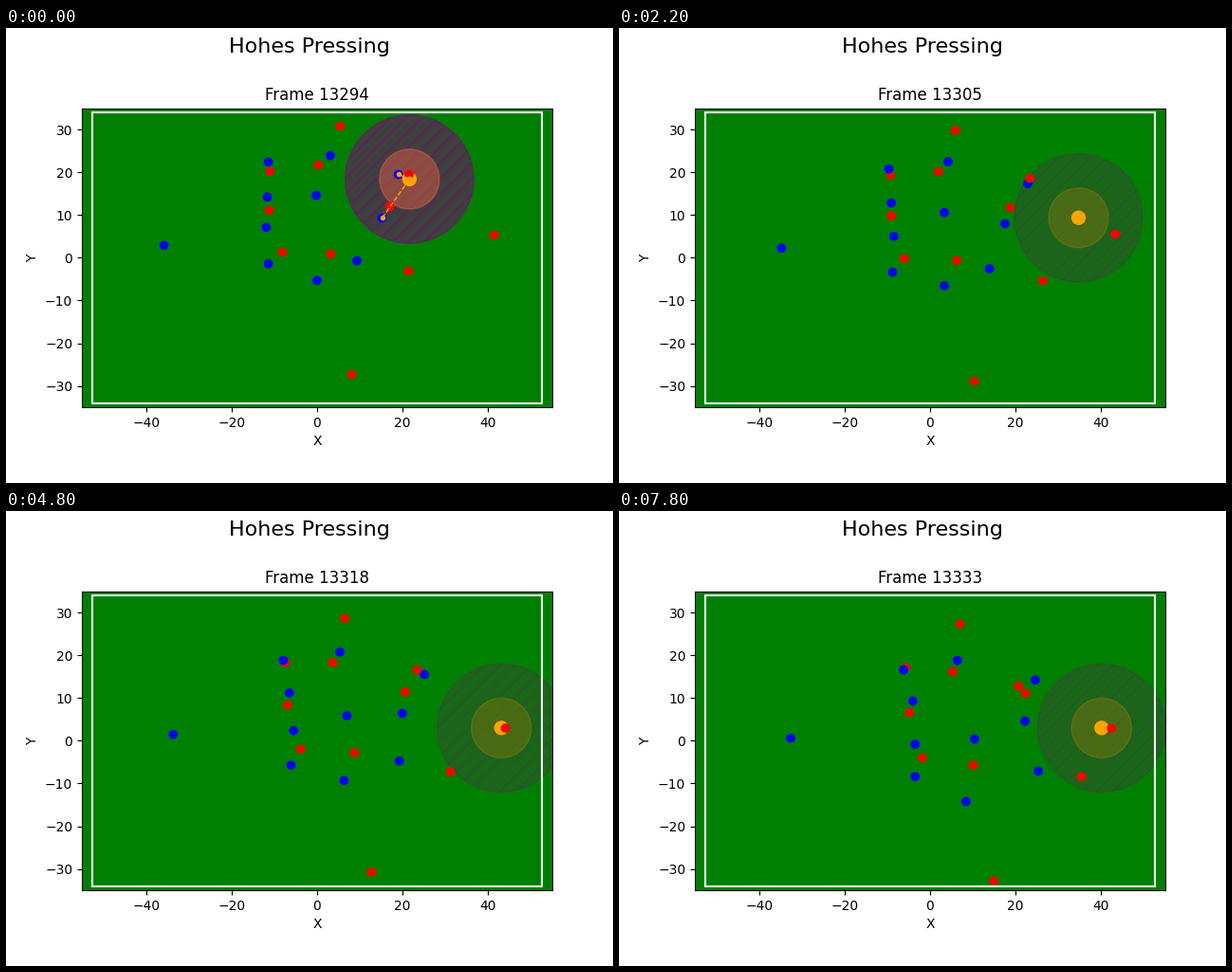
A matplotlib script that plays this animation: 640x480 px, repeating every 8000 ms.

```python
import numpy as np
import matplotlib.pyplot as plt
from matplotlib.animation import FuncAnimation
from matplotlib.patches import Circle, Rectangle

FRAMES, INTERVAL, FIRST = 40, 200, 13294
NEAR, FAR = 7, 15  # pressing radii in metres

# Paths are pitch positions in metres, evenly spaced over the loop
BALL = [(21.6, 18.4), (33.3, 10.3), (41.7, 4.4), (42.8, 2.4), (40.1, 3.0)]
RED = [
    [(5.4, 30.8), (7.0, 27.3)],
    [(0.3, 21.7), (5.3, 16.2)],
    [(-11.0, 20.2), (-5.7, 17.1)],
    [(-11.2, 11.1), (-4.8, 6.6)],
    [(-8.1, 1.3), (-1.8, -4.0)],
    [(3.2, 0.9), (8.0, -2.0), (10.1, -5.7)],
    [(8.1, -27.3), (14.9, -32.8)],
    [(21.4, -3.1), (29.6, -6.7), (35.4, -8.4)],
    [(41.4, 5.3), (43.5, 5.2), (44.0, 2.6), (42.4, 2.9)],
    [(17.0, 12.0), (22.3, 11.1)],
]
BLUE = [
    [(-11.4, 22.4), (-6.2, 16.6)],
    [(3.1, 23.9), (6.4, 18.8)],
    [(-11.6, 14.2), (-4.0, 9.3)],
    [(-11.9, 7.1), (-6.4, 3.3), (-3.5, -0.8)],
    [(-11.4, -1.4), (-3.5, -8.4)],
    [(-35.8, 2.9), (-32.6, 0.6)],
    [(-0.2, 14.6), (10.4, 0.4)],
    [(0.0, -5.3), (5.4, -8.2), (8.4, -14.2)],
    [(9.3, -0.7), (17.4, -4.0), (25.3, -7.1)],
    [(15.2, 9.3), (22.2, 4.6)],
    [(19.0, 19.5), (24.6, 16.1), (24.6, 14.2)],
]
WINGER = [(21.5, 19.5), (23.6, 17.4), (20.7, 12.8)]  # red, drawn on top


def place(path, u):
    """Position on a path at loop fraction u."""
    pts = np.array(path)
    if len(pts) == 2:  # straight run that slows down along the pitch
        return pts[0] + (pts[1] - pts[0]) * (u + 0.25 * u * (1 - u), u)
    knots = np.linspace(0, 1, len(pts))
    return np.polyval(np.polyfit(knots, pts, len(pts) - 1), u)if pts.ndim == 1 \
        else np.array([np.polyval(np.polyfit(knots, c, len(pts) - 1), u)
                       for c in pts.T])


fig, ax = plt.subplots(figsize=(6.4, 4.8), dpi=100)
fig.suptitle("Hohes Pressing", fontsize=16)
ax.set(xlim=(-55, 55), ylim=(-35, 35), xlabel="X", ylabel="Y",
       facecolor="green", aspect="equal")
title = ax.set_title("")

outer = ax.add_patch(Circle((0, 0), FAR, color="purple", hatch="//"))
inner = ax.add_patch(Circle((0, 0), NEAR))
ax.add_patch(Rectangle((-52.5, -34), 105, 68, fill=False, ec="white",
                       lw=1.5, zorder=2))

paths = [BALL] + RED + BLUE + [WINGER]
colors = ["orange"] + ["red"] * len(RED) + ["blue"] * len(BLUE) + ["red"]
sizes = [100] + [36] * (len(paths) - 1)
dots = ax.scatter(*np.zeros((2, len(paths))), c=colors, s=sizes, zorder=1)
links, = ax.plot([], [], "o--", color="orange", ms=3, lw=1)


def update(n):
    title.set_text(f"Frame {FIRST + n}")
    spots = np.array([place(p, n / (FRAMES - 1)) for p in paths])
    dots.set_offsets(spots)

    ball = spots[0]
    blue = spots[1 + len(RED):-1]
    dist = np.hypot(*(blue - ball).T)
    close = blue[dist < FAR]
    pressing = dist.min() < NEAR and len(close) > 1

    outer.set_center(ball)
    outer.set_alpha(0.5 if pressing else 0.2)
    inner.set_center(ball)
    inner.set_color("tomato" if pressing else "darkorange")
    inner.set_alpha(0.4 if pressing else 0.2)

    gap = (np.nan, np.nan)
    route = [gap]
    if pressing:
        for p in close:
            route += [p, ball, gap]
    links.set_data(*np.array(route).T)
    return title, outer, inner, dots, links


anim = FuncAnimation(fig, update, frames=FRAMES, interval=INTERVAL,
                     repeat=True, repeat_delay=0, blit=False)
plt.show()
```
